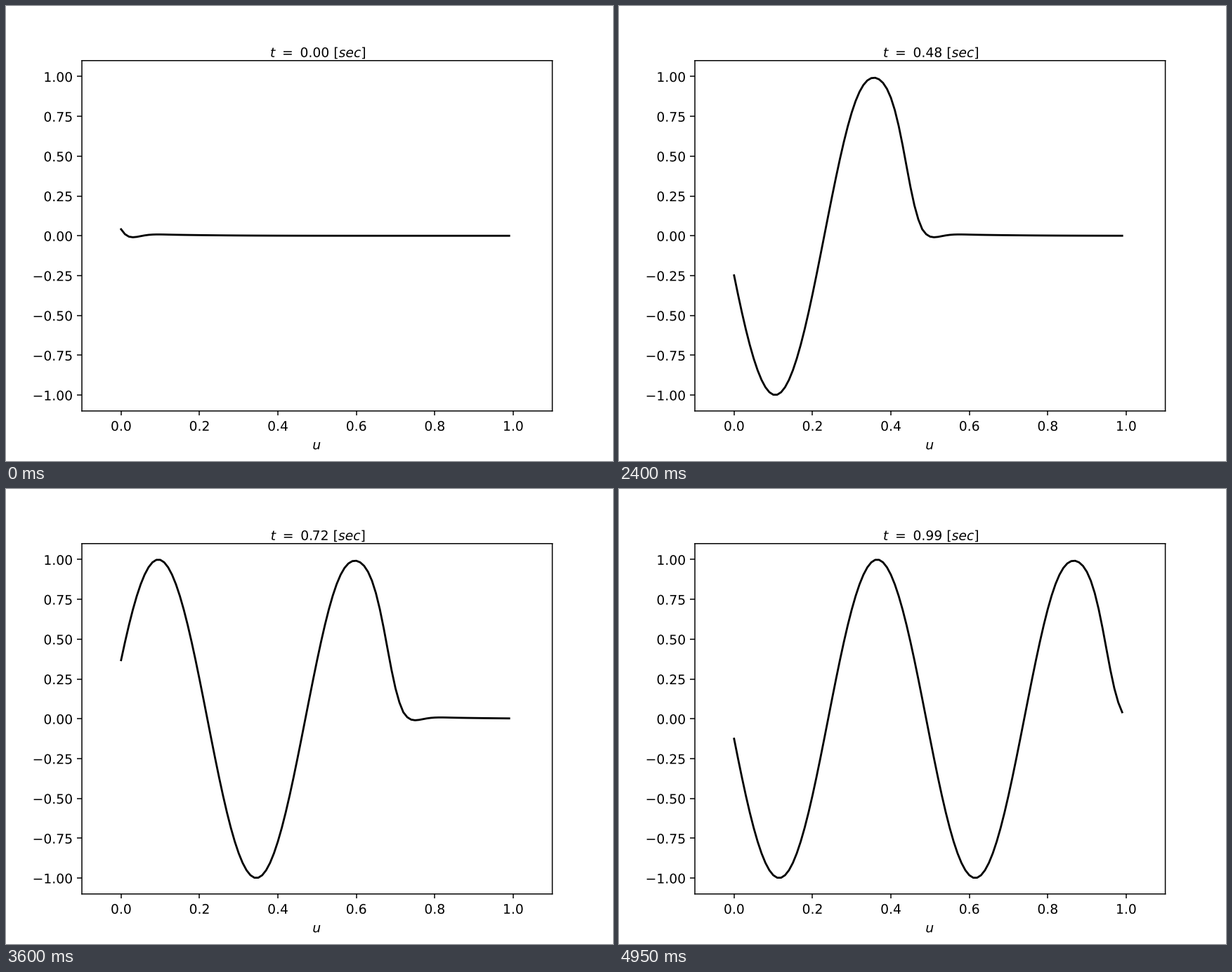
A matplotlib script for the animation above (5000 ms loop, 864 px wide and 648 px high).

```python
import matplotlib.pyplot as plt
import numpy as np
from matplotlib import patheffects
from matplotlib.animation import FuncAnimation

FRAMES = 100
STEP = 0.01

# Outlined text and unsnapped lines keep their exact, fractional positions.
plt.rcParams["path.effects"] = [patheffects.Normal()]
plt.rcParams["path.snap"] = False


def ring(steps, size, decay, half_period, shift):
    """Damped oscillation spreading from the wave front."""
    swing = np.cos(np.pi * (steps + shift) / half_period)
    return size * np.exp(-steps / decay) * swing


def wave(lag):
    """Height of the travelling wave, lag steps behind its front."""
    behind = np.maximum(lag, 0)
    ahead = np.maximum(-lag, 0)
    sine = np.sin(4 * np.pi * behind * STEP)
    swell = 0.00255 * ahead * np.exp(-ahead / 8)
    return np.where(
        lag > 0,
        sine + ring(behind, 0.115, 5, 5.2, 2),
        swell + ring(ahead, 0.0684, 2.5, 6.6, 1.95),
    )


fig, ax = plt.subplots(figsize=(6.4, 4.8), dpi=135)
ax.set_xlim(-0.1, 1.1)
ax.set_ylim(-1.1, 1.1)
ax.set_xlabel(r"$u$")

index = np.arange(100)
line, = ax.plot(index * STEP, wave(-index), color="black", lw=1.5)
clock = ax.text(0.5025, 1.01, "", ha="center", transform=ax.transAxes)


def update(frame):
    line.set_ydata(wave(frame - index))
    clock.set_text(rf"$t\ =\ {frame * STEP:.2f}\ [sec]$")
    return line, clock


anim = FuncAnimation(fig, update, frames=FRAMES, interval=50,
                     repeat=True, repeat_delay=0)
plt.show()
```
